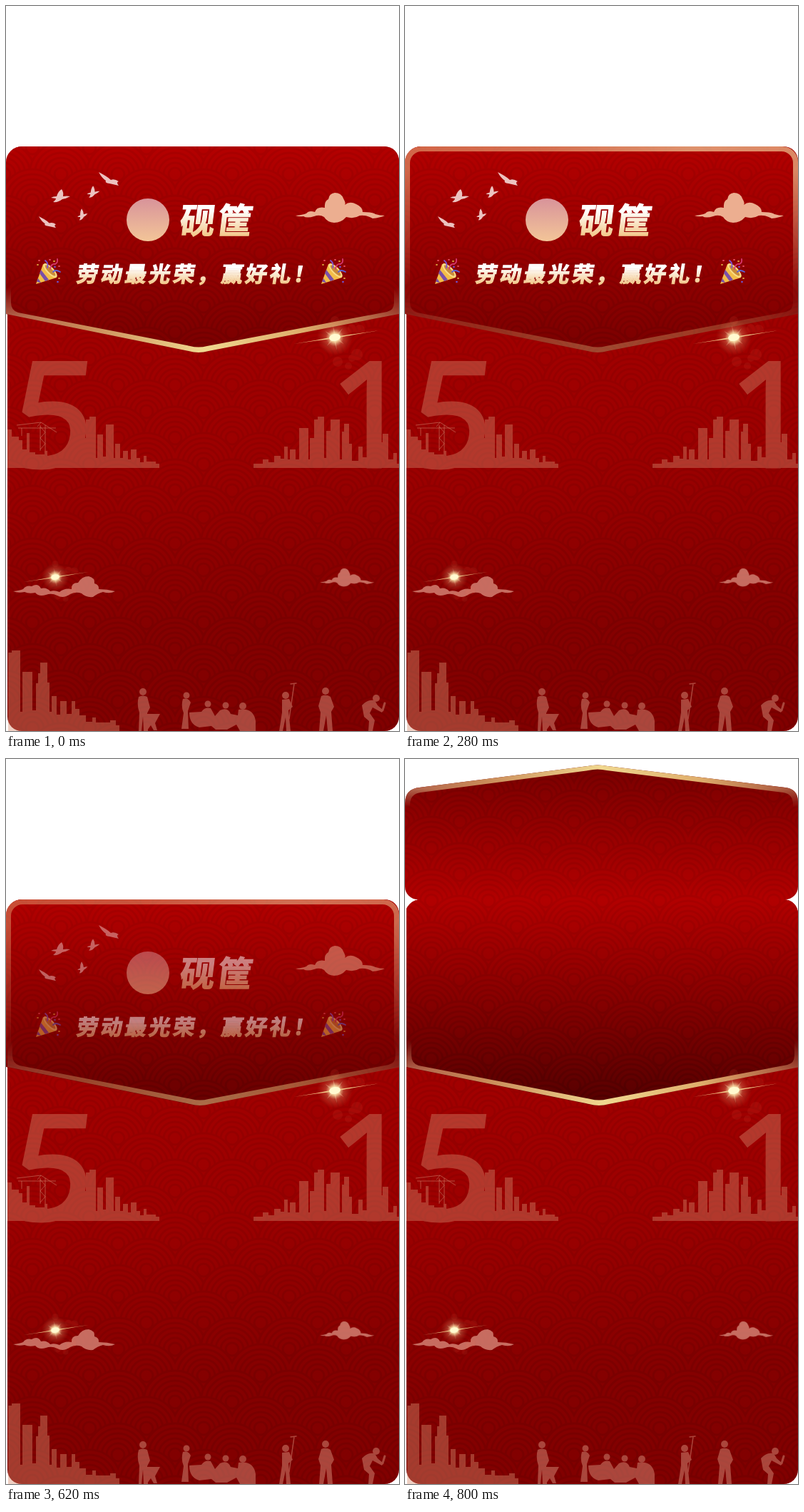
An HTML page that plays this animation: 551x1017 px, repeating every 900 ms.

```html
<!DOCTYPE html>
<html lang="zh">
<head>
<meta charset="utf-8">
<style>
  html, body { margin: 0; width: 100%; height: 100%; overflow: hidden; background: #fff; }
  svg { display: block; width: 100vw; height: 100vh; }
  .cjk {
    font-family: "Noto Sans CJK SC", "Noto Sans CJK", sans-serif; font-weight: 900;
    fill: url(#lettering); stroke: url(#lettering); stroke-width: 1.2;
  }
  .digit { font: 400 204px "Open Sans", "Noto Sans", sans-serif; stroke: #d78c6e; stroke-width: 5; }
</style>
</head>
<body>
<svg viewBox="0 0 551 1017" preserveAspectRatio="none">
  <defs>
    <linearGradient id="bodyFill" gradientUnits="userSpaceOnUse" x1="200" y1="430" x2="260" y2="1017">
      <stop stop-color="#9f0000"/><stop offset=".35" stop-color="#990000"/>
      <stop offset=".75" stop-color="#800000"/><stop offset="1" stop-color="#7c0000"/>
    </linearGradient>
    <linearGradient id="frontFill" gradientUnits="userSpaceOnUse" x1="0" y1="197" x2="0" y2="486">
      <stop stop-color="#b20000"/><stop offset=".3" stop-color="#a00000"/><stop offset="1" stop-color="#740000"/>
    </linearGradient>
    <linearGradient id="insideFill" gradientUnits="userSpaceOnUse" x1="0" y1="197" x2="0" y2="486">
      <stop stop-color="#b00000"/><stop offset=".35" stop-color="#900000"/><stop offset="1" stop-color="#4c0000"/>
    </linearGradient>
    <linearGradient id="raisedFill" gradientUnits="userSpaceOnUse" x1="0" y1="8" x2="0" y2="197">
      <stop stop-color="#740000"/><stop offset=".5" stop-color="#920000"/><stop offset="1" stop-color="#b00000"/>
    </linearGradient>
    <linearGradient id="goldV" gradientUnits="userSpaceOnUse" x1="0" y1="0" x2="551" y2="0">
      <stop stop-color="#b0604a"/><stop offset=".2" stop-color="#c98a58"/><stop offset=".5" stop-color="#f0d890"/>
      <stop offset=".75" stop-color="#dfae6c"/><stop offset="1" stop-color="#a34c38"/>
    </linearGradient>
    <linearGradient id="goldTop" gradientUnits="userSpaceOnUse" x1="0" y1="0" x2="551" y2="0">
      <stop stop-color="#e39a6c"/><stop offset=".35" stop-color="#e8a878"/>
      <stop offset=".72" stop-color="#f6dca4"/><stop offset="1" stop-color="#f2cc96"/>
    </linearGradient>
    <linearGradient id="lettering" x1="0" y1="0" x2="0" y2="1">
      <stop offset=".35" stop-color="#fff"/><stop offset=".85" stop-color="#f3c98c"/>
    </linearGradient>
    <linearGradient id="badge" x1="0" y1="0" x2="0" y2="1">
      <stop stop-color="#d8939a"/><stop offset="1" stop-color="#f3c598"/>
    </linearGradient>
    <linearGradient id="fadeIn" gradientUnits="userSpaceOnUse" x1="0" y1="395" x2="0" y2="436">
      <stop stop-color="#000"/><stop offset="1" stop-color="#fff"/>
    </linearGradient>
    <linearGradient id="fadeOut" gradientUnits="userSpaceOnUse" x1="0" y1="230" x2="0" y2="410">
      <stop stop-color="#fff"/><stop offset="1" stop-color="#000"/>
    </linearGradient>
    <linearGradient id="fadeRaised" gradientUnits="userSpaceOnUse" x1="0" y1="42" x2="0" y2="68">
      <stop stop-color="#fff"/><stop offset="1" stop-color="#000"/>
    </linearGradient>
    <mask id="lowerPart"><path d="M0 0H560V1017H0Z" fill="url(#fadeIn)"/></mask>
    <mask id="upperPart"><path d="M0 0H560V1017H0Z" fill="url(#fadeOut)"/></mask>
    <mask id="raisedPart"><path d="M0 0H560V1017H0Z" fill="url(#fadeRaised)"/></mask>
    <radialGradient id="glow">
      <stop stop-color="#fffbe0"/><stop offset=".25" stop-color="#ffeeb0" stop-opacity=".85"/>
      <stop offset=".5" stop-color="#eeb080" stop-opacity=".3"/><stop offset="1" stop-color="#e08050" stop-opacity="0"/>
    </radialGradient>

    <g id="scale" stroke="#300" stroke-width="3">
      <circle r="44" fill="#c00"/>
      <g fill="none"><circle r="37"/><circle r="30"/><circle r="23"/><circle r="16"/><circle r="9"/></g>
    </g>
    <pattern id="waves" patternUnits="userSpaceOnUse" x="-3" y="14" width="80" height="74">
      <use href="#scale" x="40" y="-37"/>
      <use href="#scale"/><use href="#scale" x="80"/>
      <use href="#scale" x="40" y="37"/>
      <use href="#scale" y="74"/><use href="#scale" x="80" y="74"/>
      <use href="#scale" x="40" y="111"/>
    </pattern>

    <path id="bodyShape" d="M2 217A20 20 0 0 1 22 197H531A20 20 0 0 1 551 217V997A20 20 0 0 1 531 1017H22A20 20 0 0 1 2 997Z"/>
    <path id="flapShape" d="M0 219A22 22 0 0 1 22 197H529A22 22 0 0 1 551 219V432L284 484Q270 488 256 484L0 432Z"/>
    <path id="insideShape" d="M2 217A20 20 0 0 1 22 197H531A20 20 0 0 1 551 217V432L286 484Q272 488 258 484L2 432Z"/>
    <path id="raisedShape" d="M0 62Q0 42 20 40L256 10Q270 7 284 10L533 40Q551 42 551 60V179A18 18 0 0 1 533 197H18A18 18 0 0 1 0 179Z"/>
    <path id="rim" fill-rule="evenodd" d="M0 219A22 22 0 0 1 22 197H529A22 22 0 0 1 551 219V432L284 484Q270 488 256 484L0 432Z
      M7 220A16 16 0 0 1 23 204H528A16 16 0 0 1 544 220V416Q544 427 534 429L282 477Q270 480 258 477L17 430Q7 427 7 416Z"/>
    <path id="cloud" d="M406 294Q416 293 421 291Q425 286 433 289Q436 281 447 283Q446 274 452 271Q453 263 461 262Q470 262 473 270
      Q477 277 475 279Q482 273 491 278Q500 282 500 289Q513 289 518 292Q524 294 531 294Q524 297 514 298Q506 293 496 294
      Q488 299 477 296Q470 304 460 304Q450 303 446 296Q440 292 432 295Q422 298 417 295Q411 296 406 294Z"/>
    <path id="glider" d="M0 0Q4 2 9 5Q14 8 17 11Q22 9 28 13Q24 14 28 19Q20 17 15 16Q8 15 10 12Q4 8 0 0Z"/>
    <path id="flapper" d="M0 12Q3 10 8 10Q10 3 15 0Q18 4 17 10Q22 9 27 10Q22 13 16 14Q10 19 3 18Q7 15 7 13Z"/>
    <g id="popper">
      <path d="M3 37L13 9Q27 13 32 28Z" fill="#f3bd48"/>
      <path d="M8 22L10 17L21 31L16 33ZM4 34L6 29L10 35Z" fill="#7a50a8"/>
      <ellipse cx="23" cy="18" rx="5" ry="13" transform="rotate(-44 23 18)" fill="#f9dc84"/>
      <ellipse cx="23" cy="18" rx="3" ry="10" transform="rotate(-44 23 18)" fill="#c98a3a"/>
      <g fill="none" stroke-width="1.8" stroke-linecap="round">
        <path d="M19 14Q21 8 16 4" stroke="#7b54d0"/><path d="M23 16Q24 8 30 9Q34 7 33 2" stroke="#d83870"/>
        <path d="M27 20Q30 16 37 20" stroke="#5b62d8"/>
        <path d="M7 4h1M22 3h1M35 12h1" stroke="#e04a5a"/><path d="M5 10h1M28 5h1M35 29h1" stroke="#d9a13b"/>
        <path d="M29 13h1M33 34h1" stroke="#6a5be0"/>
      </g>
    </g>
    <g id="spark">
      <g fill="#ff7050" opacity=".09">
        <circle cx="24" cy="-13" r="6"/><circle cx="35" cy="-11" r="7"/><circle cx="0" cy="-24" r="6"/>
        <circle cx="4" cy="34" r="7"/><circle cx="19" cy="40" r="5"/><circle cx="31" cy="24" r="8"/><circle cx="24" cy="29" r="5"/>
      </g>
      <circle r="25" fill="url(#glow)"/>
      <g transform="rotate(-9)">
        <path d="M-58 0Q-8 -.5 0 -1.5Q8 -.5 62 0Q8 .5 0 1.5Q-8 .5 -58 0Z" fill="#f0c888"/>
        <path d="M0 -17L2 -3L13 -11L4 0L11 11L1 3L0 18L-2 3L-13 10L-4 0L-12 -11L-1 -3Z" fill="#ffe9b8" opacity=".3"/>
        <ellipse rx="8" ry="5" fill="#fffad0"/>
      </g>
    </g>
  </defs>

  <use href="#bodyShape" fill="url(#bodyFill)"/>
  <use href="#bodyShape" fill="url(#waves)" opacity=".065"/>

  <g fill="#d78c6e" opacity=".4">
    <text class="digit" transform="translate(-1 645.5) skewX(-7)">5</text>
    <text class="digit" x="453" y="645.5">1</text>
    <path data-base="648" data-end="215" data-steps="2 594 8 604 18 609 23 622 29 599 33 626 41 629 54 624 58 633 70 636 84 630 95 608 103 604 109 606 112 580 117 576 126 634 128 601 136 632 140 587 151 634 153 614 160 634 164 624 171 636 175 622 183 634 188 640 193 631 197 639 210 642"/>
    <path data-base="648" data-end="551" data-steps="347 642 360 636 368 640 376 631 385 635 390 618 395 636 398 622 406 636 411 592 424 636 426 606 432 580 437 576 446 634 449 596 455 580 468 636 471 597 474 586 481 614 485 638 494 618 500 633 511 628 520 612 528 600 536 636 543 627 548 642"/>
  </g>
  <path d="M48 624V588M55 624V588M48 622L55 614L48 606L55 598L48 590M15 588L49 584L71 598M17 592H70M49 584L44 590M22 592V603"
    fill="none" stroke="#ce7c67" stroke-width="1" opacity=".6"/>
  <path data-base="1017" data-end="159" data-steps="3 907 8 904 20 990 23 934 37 988 42 950 45 936 48 921 58 949 61 990 64 968 71 994 76 975 85 993 92 975 97 986 103 995 112 1004 121 998 126 1005 146 1002 154 1009"
    fill="#d78c6e" opacity=".42"/>

  <g fill="#d78c78" stroke="#d78c78" stroke-linecap="round" stroke-linejoin="round" stroke-width="0" opacity=".5">
    <circle cx="192" cy="962" r="5"/>
    <path d="M186 969Q192 966 198 969L202 984L198 992L199 1017H193L192 997L190 1017H186L187 991Q183 980 186 969ZM192 993H216L209 1006L212 1016H207L203 1009L198 1016Z"/>
    <circle cx="253" cy="967" r="4.5"/>
    <path d="M248 972Q256 970 259 977L255 989L256 1014H246L249 992Q245 982 248 972Z"/>
    <circle cx="283" cy="979" r="4.5"/><circle cx="308" cy="981" r="4.5"/><circle cx="332" cy="982" r="5"/>
    <path d="M257 991L274 990Q279 983 287 985L293 996L300 988Q311 983 315 993L325 995L326 987
      Q347 984 350 1003V1017H328L323 1008L310 1015H294L288 1010L271 1012Q257 1008 257 991Z"/>
    <circle cx="392" cy="967" r="5"/>
    <path d="M387 973L397 972L402 983L396 988L399 1017H393L392 998L388 1017H383L387 991Z"/>
    <path d="M397 1000L404 951M399 951L407 950" stroke-width="1.5" fill="none"/>
    <circle cx="448" cy="961" r="5"/>
    <path d="M442 968Q449 965 455 969L460 983L456 990L458 1017H451L449 995L445 1017H439L441 991L438 982Z"/>
    <circle cx="519" cy="971" r="5"/>
    <path d="M499 981Q507 972 517 974L521 981L529 988L527 991L514 984L510 992L517 1002L514 1017H508L509 1003L502 997Z"/>
    <path d="M528 988L531 978" stroke-width="3"/>
  </g>

  <g fill="#dc9080" opacity=".75">
    <path d="M10 821Q19 820 24 818Q28 812 36 814Q45 809 49 817Q57 815 62 821Q68 819 75 822Q82 816 92 818Q91 809 101 809
      Q106 800 116 800Q125 802 124 810Q131 812 130 818Q142 818 153 821Q146 825 136 822Q128 824 122 829Q112 830 106 824
      Q98 821 90 825Q80 832 72 827Q64 823 56 826Q46 829 41 823Q32 825 26 822Q17 824 10 821Z"/>
    <use href="#cloud" transform="translate(192.5 629) scale(.61)"/>
  </g>
  <use href="#spark" transform="translate(69 801) scale(.77)"/>

  <use href="#flapShape" fill="url(#frontFill)"/>
  <g id="inside"><use href="#insideShape" fill="url(#insideFill)"/></g>
  <use href="#flapShape" fill="url(#waves)" opacity=".065"/>
  <use id="rimLower" href="#rim" fill="url(#goldV)" mask="url(#lowerPart)"/>
  <use id="rimUpper" href="#rim" fill="url(#goldTop)" mask="url(#upperPart)"/>
  <g id="rimInside"><use href="#rim" x="2" fill="url(#goldV)" mask="url(#lowerPart)"/></g>

  <g id="greeting">
    <g fill="#ecc3c0">
      <use href="#glider" x="130" y="233"/><use href="#glider" transform="translate(46 295) scale(.86)"/>
      <use href="#flapper" x="63" y="257"/>
      <use href="#flapper" transform="translate(112 254) rotate(-8) scale(.68 .85)"/>
      <use href="#flapper" transform="translate(98 286) rotate(-12) scale(.55 .85)"/>
    </g>
    <use href="#cloud" fill="#ecae90"/>
    <circle cx="199" cy="300" r="30" fill="url(#badge)"/>
    <g class="cjk">
      <g transform="translate(242 319) skewX(-7)">
        <text font-size="49" letter-spacing="4">砚筐</text>
      </g>
      <g transform="translate(98 387) skewX(-9)">
        <text font-size="30" letter-spacing="3.8">劳动最光荣，赢好礼！</text>
      </g>
    </g>
    <use href="#popper" x="39" y="353"/><use href="#popper" x="439" y="353"/>
  </g>

  <use href="#spark" x="461" y="465"/>

  <g id="raised">
    <path d="M0 199H2V433H0Z" fill="#fff"/>
    <use href="#raisedShape" fill="url(#raisedFill)"/>
    <use href="#raisedShape" fill="url(#waves)" opacity=".065"/>
    <path fill="url(#goldV)" fill-rule="evenodd" mask="url(#raisedPart)" d="M0 62Q0 42 20 40L256 10Q270 7 284 10L533 40Q551 42 551 60V197H0Z
      M7 64Q7 49 22 47L257 16Q270 13 283 16L530 47Q544 49 544 64V197H7Z"/>
  </g>
</svg>
<script>
  const byId = id => document.getElementById(id);
  const setOpacity = (id, value) => byId(id).setAttribute('opacity', value);
  const clamp = v => Math.max(0, Math.min(1, v));

  // Skylines: pairs of left edge and roof height.
  for (const path of document.querySelectorAll('[data-steps]')) {
    const { base, end, steps } = path.dataset;
    const roofs = steps.replace(/(\d+) (\d+)/g, 'H$1V$2');
    path.setAttribute('d', `M${steps.split(' ')[0]} ${base}${roofs}H${end}V${base}Z`);
  }

  // Each 400 ms half holds its first pose for 100 ms, then steps every 60 ms.
  function stepAt(time) {
    const local = time % 400;
    return 6 * Math.floor(time / 400) + (local < 100 ? 0 : 1 + Math.floor((local - 100) / 60));
  }

  function render() {
    const step = stepAt(performance.now() % 900);
    const closing = clamp(step / 6);
    const opening = clamp((step - 6) / 6);
    setOpacity('rimLower', 1 - closing);
    setOpacity('rimUpper', closing * (1 - opening));
    setOpacity('greeting', 1 - opening);
    setOpacity('inside', opening);
    setOpacity('rimInside', opening);
    setOpacity('raised', opening > 0.5 ? 1 : 0);
    requestAnimationFrame(render);
  }
  render();
</script>
</body>
</html>
```
